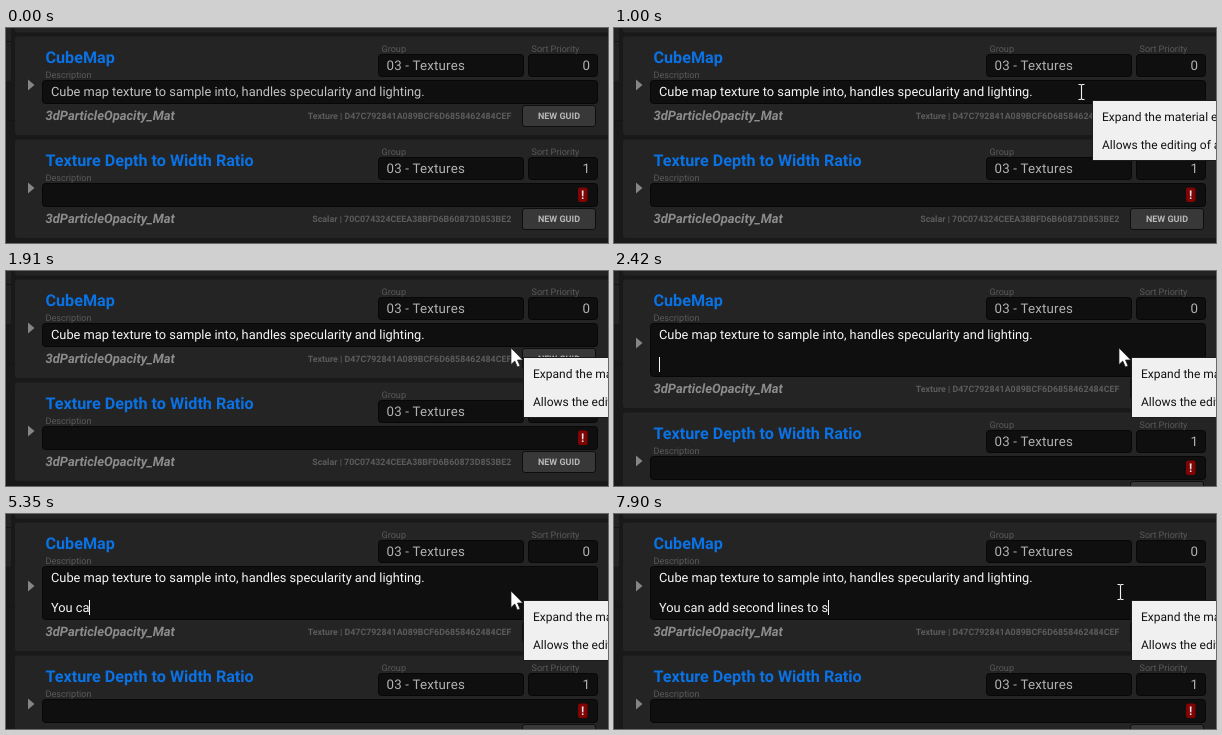
Write an HTML page that moves like this. It is 602 by 215 pixels and loops after 8000 ms.

```html
<!DOCTYPE html>
<html lang="en">
<head>
<meta charset="utf-8">
<title>Material parameter notes</title>
<style>
  html, body { margin: 0; width: 100%; height: 100%; overflow: hidden; background: #191919; }
  svg { display: block; width: 602px; height: 215px; font-family: Roboto, "Liberation Sans", sans-serif; text-rendering: geometricPrecision; }
  text { white-space: pre; }
  .panel { fill: #242424; }
  .field { fill: #0f0f0f; stroke: #070707; }
  .field.hover { stroke: #2a2a2a; }
  .title { font: bold 16.15px Roboto, sans-serif; fill: #0a72e4; }
  .label { font-size: 9.1px; fill: #5a5a5a; }
  .value { font-size: 13.3px; letter-spacing: .2px; fill: #b2b2b2; }
  .note { font-size: 12.8px; fill: #c2c2c2; }
  .note.focus { fill: #f6f6f6; }
  .asset { font: italic bold 13px Roboto, sans-serif; fill: #8c8c8c; }
  .guid { font: bold 8.85px Roboto, sans-serif; fill: #5c5c5c; }
  .button { fill: #383838; stroke: #0e0e0e; }
  .caption { font: bold 9px Roboto, sans-serif; fill: #b8b8b8; }
  .end { text-anchor: end; }
  .mid { text-anchor: middle; }
  .arrow { fill: #858585; }
  #tip text { font-size: 12px; fill: #111; }
</style>
</head>
<body>
<svg id="stage" viewBox="0 0 602 215">
  <rect width="602" height="215" fill="#191919"/>
  <rect x="-4" y="-4" width="9" height="57" rx="2" fill="#232323"/>
  <path d="M0 13.5H5M0 92.5H8" stroke="#151515"/>
  <rect class="panel" x="9" y="-20" width="610" height="24.5" rx="3"/>
  <g id="rows"></g>
  <g id="tip" opacity="0">
    <rect x=".5" y=".5" width="330" height="60" fill="#f0f0f0" stroke="#1c1c1c"/>
    <text x="10" y="20.5">Expand the material editor description field</text>
    <text x="10" y="48.5">Allows the editing of all lines in the description</text>
  </g>
  <g id="pointer">
    <path id="hand" d="M0 0V16.5L3.8 13L6.4 19L9 17.9L6.5 12H11.8Z" fill="#fff" stroke="#222" stroke-width=".7"/>
    <path id="beam" d="M-3 -7.5H-1L0 -6.8L1 -7.5H3M0 -7V7M-3 7.5H-1L0 6.8L1 7.5H3" fill="none" stroke="#f2f2f2" stroke-width="1.1"/>
  </g>
</svg>
<script>
const LOOP = 8000, PITCH = 103, LINE = 15;
const $ = id => document.getElementById(id);

function row(id, title, order, guid, extra) {
  return `<g id="${id}">
    <rect class="panel" id="${id}Panel" x="9" y="8.5" width="610" height="98.5" rx="3"/>
    <path class="arrow" id="${id}Arrow" d="M22 51.5L28.5 57L22 62.5Z"/>
    <text class="title" x="39.5" y="35">${title}</text>
    <text class="label" x="39.5" y="50">Description</text>
    <text class="label" x="375.5" y="23.5">Group</text>
    <text class="label" x="525.5" y="23.5">Sort Priority</text>
    <rect class="field" x="372.5" y="26.5" width="145" height="22" rx="3"/>
    <rect class="field" x="522.5" y="26.5" width="69" height="22" rx="3"/>
    <text class="value" x="380.5" y="41.5">03 - Textures</text>
    <text class="value end" x="584.3" y="41.5">${order}</text>
    <rect class="field" id="${id}Note" x="36.5" y="52.5" width="555" height="23" rx="3"/>
    ${extra}
    <g id="${id}Foot">
      <text class="asset" x="39.5" y="91.5">3dParticleOpacity_Mat</text>
      <text class="guid end" x="505.3" y="91">${guid}</text>
      <rect class="button" x="516.5" y="77.5" width="73" height="21" rx="2.5"/>
      <text class="caption mid" x="553" y="91">NEW GUID</text>
    </g>
  </g>`;
}

$("rows").innerHTML =
  row("cube", "CubeMap", 0, "Texture | D47C792841A089BCF6D6858462484CEF",
    `<text class="note" id="first" x="45" y="68">Cube map texture to sample into, handles specularity and lighting.</text>
     <text class="note focus" id="typed" x="45" y="98"></text>
     <rect id="caret" width="1" height="15" fill="#f4f4f4"/>`) +
  row("ratio", "Texture Depth to Width Ratio", 1, "Scalar | 70C074324CEEA38BFD6B60873D853BE2",
    `<rect x="572" y="56.5" width="9.5" height="14.5" rx="2" fill="#800404"/>
     <text class="mid" x="576.7" y="68" font-size="12" font-weight="bold" fill="#e4e4e4">!</text>`);

// Bursts of typing: text, time of first key, time of last key
const bursts = [
  ["You can ", 4910, 5450], ["a", 5890, 5890], ["dd", 6050, 6150], [" ", 6310, 6310],
  ["se", 6460, 6530], ["cond ", 6700, 7060], ["lines to s", 7260, 7900]
];
const keys = bursts.flatMap(([text, from, to]) =>
  [...text].map((ch, i) => ({ ch, at: from + (to - from) * i / Math.max(1, text.length - 1) })));

const caretOn = [[1410, 1910], [2290, 2680], [3180, 3640], [4150, 4660], [4910, 5680], [5890, LOOP]];

const clamp = v => Math.min(1, Math.max(0, v));
const within = (v, a, b) => v >= a && v < b;
const mix = (a, b, p) => a + (b - a) * p;

function pointerAt(t) {
  const enter = 1 - (1 - clamp((t - 100) / 600)) ** 2;
  const p = clamp((t - 1450) / 440), leave = p * p * (3 - 2 * p);
  return [mix(mix(596, 467, enter), 506, leave), mix(mix(222, 64, enter), 78, leave)];
}

function overText(x, y) {
  const local = y > 108 ? y - PITCH : y;
  return within(local, 53, 76) && within(x, 36, 592) ||
    within(local, 27, 49) && (within(x, 372, 518) || within(x, 522, 592));
}

const move = (id, x, y) => $(id).setAttribute("transform", `translate(${x} ${y})`);
const show = (id, on) => $(id).setAttribute("visibility", on ? "visible" : "hidden");

function draw(t) {
  const lines = t < 2290 ? 0 : t < 2420 ? 1 : 2, grow = lines * LINE;
  $("cubePanel").setAttribute("height", 98.5 + grow);
  $("cubeNote").setAttribute("height", 23 + grow);
  move("cubeArrow", 0, grow / 2);
  move("cubeFoot", 0, grow);
  move("ratio", 0, PITCH + grow);

  const [x, y] = pointerAt(t);
  const beam = overText(x, y) || t >= 7840;
  move("pointer", Math.round(x) + (beam ? .5 : -1), Math.round(y) - (beam ? 0 : 1));
  show("hand", t >= 100 && !beam);
  show("beam", t >= 100 && beam);

  const focus = t >= 900;
  $("first").classList.toggle("focus", focus);
  $("cubeNote").classList.toggle("hover", !focus && beam && within(y, 53, 76));
  $("ratioNote").classList.toggle("hover", beam && within(y, PITCH + 53, PITCH + 76));

  $("tip").setAttribute("opacity", clamp((t - 830) / 170));
  move("tip", Math.round(x) + 11, Math.round(y) + 8);

  const text = keys.filter(k => t >= k.at).map(k => k.ch).join("");
  const typed = $("typed");
  if (typed.textContent !== text) typed.textContent = text;
  const before = lines ? (text ? typed.getComputedTextLength() : 0) : $("first").getComputedTextLength();
  $("caret").setAttribute("x", Math.floor(45 + before));
  $("caret").setAttribute("y", 56 + grow);
  show("caret", caretOn.some(([a, b]) => within(t, a, b)));
}

let start;
function tick(now) {
  start ??= now;
  draw((now - start) % LOOP);
  requestAnimationFrame(tick);
}
draw(0);
requestAnimationFrame(tick);
</script>
</body>
</html>
```
